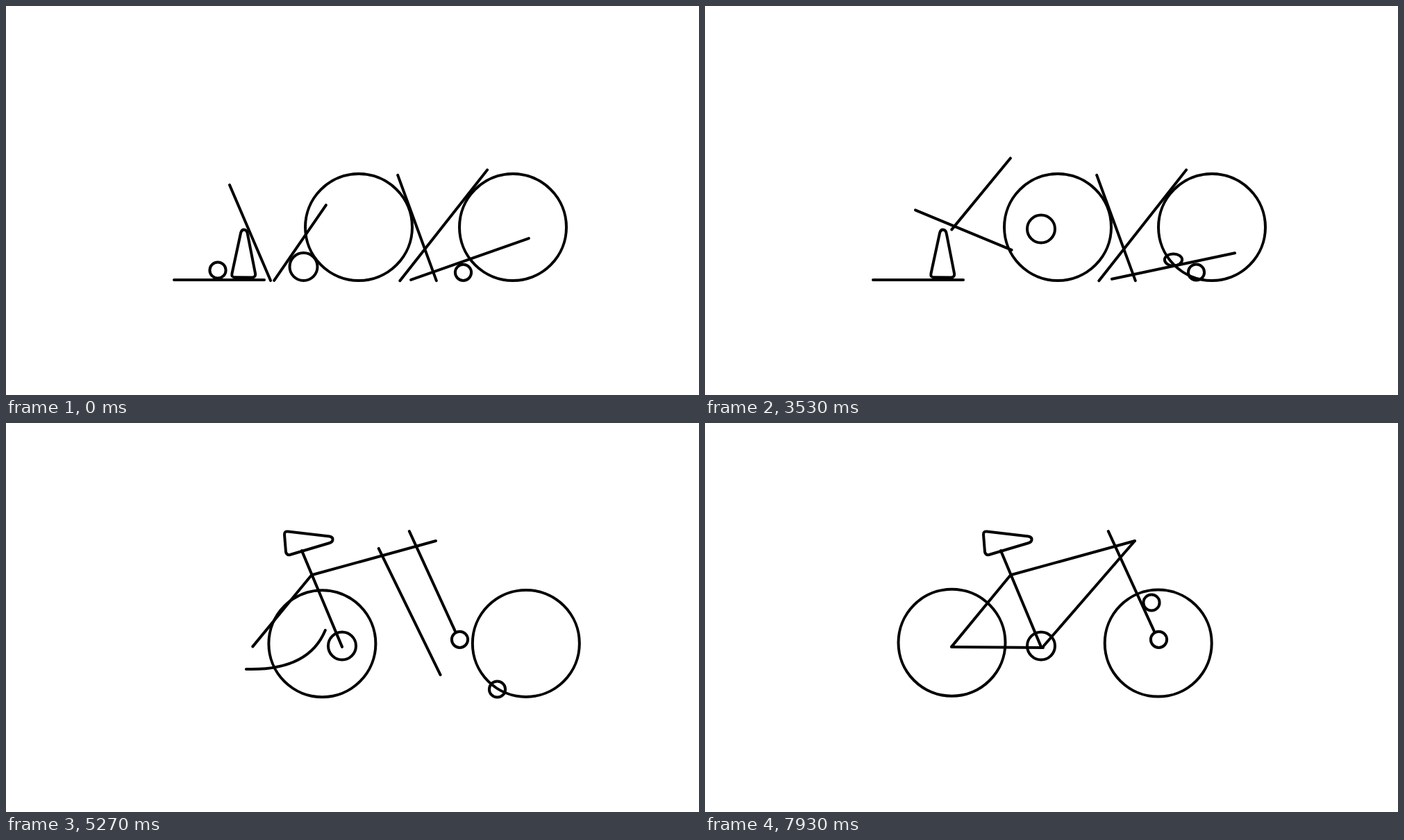
An HTML page for the animation above (8000 ms loop, 998 by 561 pixels).

```html
<!DOCTYPE html>
<html lang="en">
<head>
<meta charset="utf-8">
<title>Bicycle assembly</title>
<style>
html, body { margin: 0; width: 100%; height: 100%; overflow: hidden; background: #fff; }
svg { display: block; width: 100%; height: 100%; fill: none; stroke: #000; stroke-width: 4; stroke-linecap: round; stroke-linejoin: round; }
</style>
</head>
<body>
<svg id="stage" viewBox="0 0 998 561"></svg>
<script>
const LOOP = 8000, STEP = 1000 / 15, GLIDE = 1733;
const stage = document.getElementById('stage');
const parts = [];

const clamp = u => Math.min(1, Math.max(0, u));
const ease = u => 1 - (1 - u ** 1.5) ** 2;
// Detour along the way: peaks at 1 after a third of the move, or two thirds if late.
const hump = (e, late) => 6.75 * e * (1 - e) * (late ? e : 1 - e);

function set(el, attrs) {
  for (const k in attrs) el.setAttribute(k, attrs[k]);
}

function add(tag, attrs = {}) {
  const el = document.createElementNS('http://www.w3.org/2000/svg', tag);
  set(el, attrs);
  return stage.appendChild(el);
}

// Pose at time t: each move leads from the previous rest pose to its own,
// pushed aside by `swing` while under way.
function pose(rest, moves, t) {
  for (const { at, dur = GLIDE, to, swing = [], late } of moves) {
    if (t <= at) break;
    const e = ease(clamp((t - at) / dur)), h = hump(e, late);
    rest = rest.map((v, i) => v + (to[i] - v) * e + (swing[i] || 0) * h);
  }
  return rest;
}

const place = (x, y, a) => `translate(${x} ${y}) rotate(${a})`;

// Straight bar; its pose is centre, angle and half length. `flex` gives its bend over time.
function bar(rest, moves, flex = () => 0) {
  const el = add('path');
  parts.push(t => {
    const [x, y, a, h] = pose(rest, moves, t), b = flex(t);
    set(el, {
      d: `M${-h} 0Q${-b * .4} ${-b} ${h - b * .12} ${b * .16}`,
      transform: place(x, y, a)
    });
  });
}

// Round part; `squash` flattens it over time.
function disc(r, rest, moves, squash = () => 0) {
  const el = add('ellipse');
  parts.push(t => {
    const [cx, cy] = pose(rest, moves, t), q = squash(t);
    set(el, { cx, cy, rx: r + q, ry: r - 3 * q });
  });
}

// Chain stay: flips over and whips like a spring
bar([307, 395, 0, 65], [{ at: 4677, dur: 833, to: [421, 323.5, 180.4, 66], swing: [0, -29] }],
  t => 43 * Math.sin(Math.PI * Math.sqrt(clamp((t - 4667) / 1533))));

// Seat
const seat = add('path', {
  d: 'M-29-9Q-29.500-14-24-13.500L36-6.500Q41-5.500 40.500-1.500Q40 2 36 3L-21 20Q-26 21-27 16Z'
});
const seatMoves = [{ at: 4250, dur: 1005, to: [430, 170, 0], swing: [-10, 17] }];
parts.push(t => set(seat, { transform: place(...pose([341.2, 363.2, -84.5], seatMoves, t)) }));

// Seat tube, seat stay, fork and down tube: half a turn each
bar([351.5, 327, 66.8, 75], [{ at: 3084, to: [455, 253.5, -112.7, 75.2], swing: [-5, 15] }]);
bar([423.5, 341.5, -55.5, 66], [{ at: 1342, to: [397.6, 270.9, 129.4, 66.6], swing: [10.5, 30.4] }]);
bar([592, 320, 69.9, 81], [{ at: 3533, dur: 1267, to: [614.2, 229, -114.6, 80.2] }]);
bar([630.2, 316.3, -51.8, 101.7], [{ at: 4800, dur: 867, to: [552.7, 246.5, 130.9, 101.2] }]);

// Top tube, a lever at first
bar([668, 365, -19.4, 90], [
  { at: 2250, dur: 700, to: [674.5, 375, -12, 90.5] },
  { at: 3533, dur: 1604, to: [530, 194.5, 164.6, 92.3], swing: [-50, -72], late: true }
]);

// Wheels back off, then trade sides
disc(77, [508, 319], [{ at: 4439, dur: 1774, to: [652.7, 317.6], swing: [-167] }]);
disc(77, [730, 319], [{ at: 4489, dur: 1761, to: [355.5, 316.8], swing: [245] }]);

// Chain ring
disc(20, [428.5, 376], [{ at: 1342, to: [484, 321.5], swing: [-17.4, 15.2] }]);

// Front hub: rolls to the lever, lands and hops
disc(11.6, [305, 381], [
  { at: 490, to: [562, 386], swing: [-75] },
  { at: 2223, dur: 1310, to: [674.5, 366] },
  { at: 3533, dur: 1000, to: [653.5, 312.3], swing: [0, -10] }
], t => clamp(1 - Math.abs(t - 3533) / 200));

// Loose ball
disc(11.6, [658.5, 384.3], [
  { at: 2250, dur: 700, to: [707.5, 384] },
  { at: 6113, to: [643, 259], swing: [112.6, 24.5] }
]);

function draw() {
  const now = performance.now() % LOOP;
  const t = Math.floor((now + 4) / STEP) * STEP % LOOP;
  for (const update of parts) update(t);
  requestAnimationFrame(draw);
}
draw();
</script>
</body>
</html>
```
